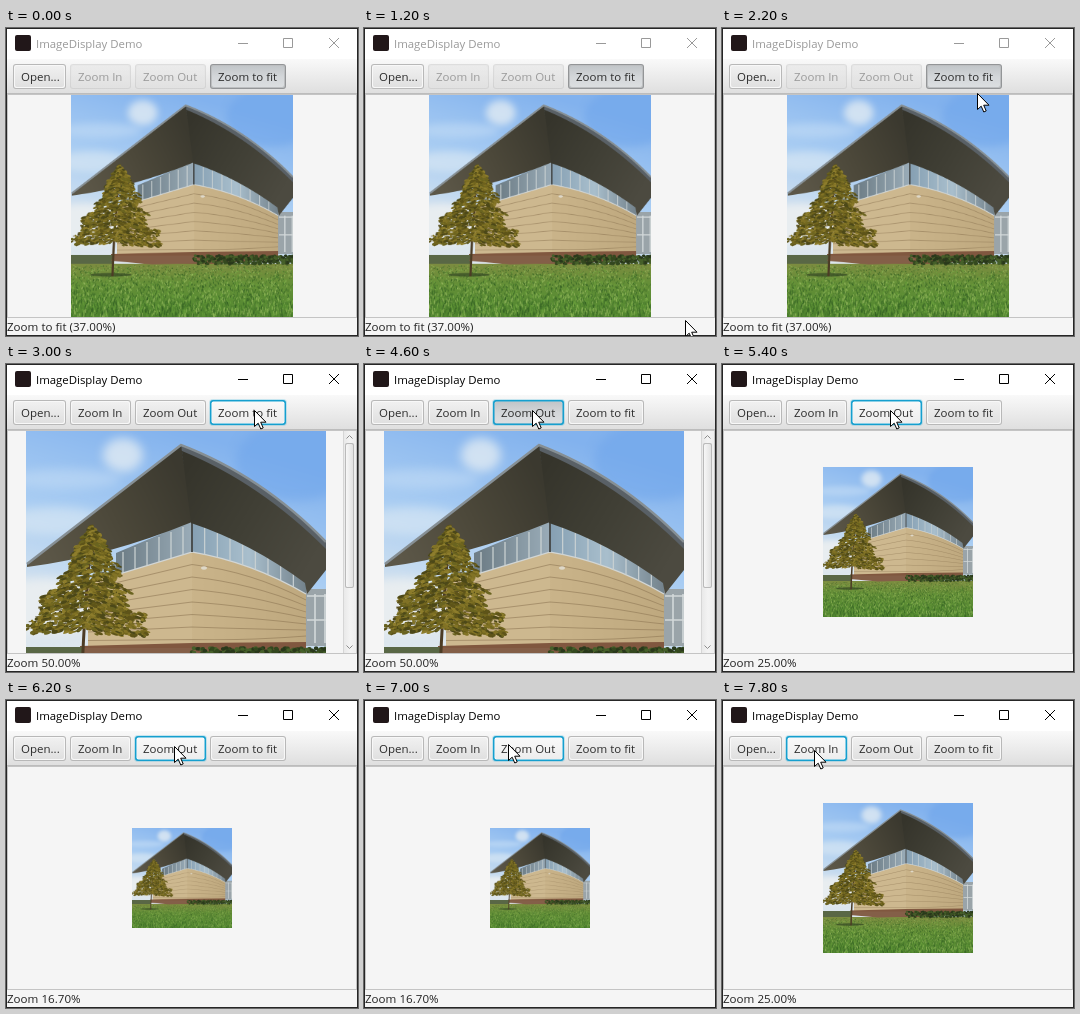
These frames come from a looping animation (352x308 px, 8 s). An HTML page with a canvas:

```html
<!DOCTYPE html>
<html lang="en">
<head>
<meta charset="utf-8">
<title>ImageDisplay Demo</title>
<style>
html, body { margin: 0; width: 100%; height: 100%; overflow: hidden; background: #fff; }
canvas { display: block; width: 100vw; height: 100vh; }
</style>
</head>
<body>
<canvas id="stage" width="352" height="308"></canvas>
<script>
const ctx = document.getElementById('stage').getContext('2d');
const LOOP = 8000, STEP = 200;
const FONT = '"Open Sans", "Noto Sans", sans-serif';

// [time, x, y] of the pointer tip
const pointerPath = [
  [1200, 321, 292], [1600, 296, 190], [2000, 258, 80], [2200, 255, 65],
  [2400, 249, 48], [2600, 248, 46], [3600, 248, 46], [4400, 168, 46],
  [6400, 168, 46], [7000, 144, 44], [7400, 98, 50], [7600, 92, 50], [8000, 92, 50]
];
const zooms = [[0, 37], [2800, 50], [4800, 25], [6200, 16.7], [7800, 25]];
const focuses = [[0, ''], [2600, 'Zoom to fit'], [4600, 'Zoom Out'], [7600, 'Zoom In']];
const presses = [[2600, 2800], [4600, 4800], [6000, 6200], [7600, 7800]];
const buttons = [['Open...', 7, 53], ['Zoom In', 64, 61], ['Zoom Out', 129, 71], ['Zoom to fit', 204, 76]];

const at = (track, t) => track.reduce((value, [start, v]) => t >= start ? v : value, track[0][1]);

function pointerAt(t) {
  if (t < pointerPath[0][0]) return null;
  const i = pointerPath.findIndex(p => p[0] > t);
  const [t0, x0, y0] = pointerPath[i - 1], [t1, x1, y1] = pointerPath[i];
  const k = (t - t0) / (t1 - t0);
  return [Math.round(x0 + (x1 - x0) * k), Math.round(y0 + (y1 - y0) * k)];
}

function rect(c, x, y, w, h, fill) {
  c.fillStyle = fill;
  c.fillRect(x, y, w, h);
}

function shape(c, fill, path) {
  c.fillStyle = fill;
  c.fill(new Path2D(path));
}

function line(c, color, width, path) {
  c.strokeStyle = color;
  c.lineWidth = width;
  c.stroke(new Path2D(path));
}

function gradient(c, x0, y0, x1, y1, ...colors) {
  const g = c.createLinearGradient(x0, y0, x1, y1);
  colors.forEach((color, i) => g.addColorStop(i / (colors.length - 1), color));
  return g;
}

function rounded(x, y, w, h, r, fill) {
  ctx.fillStyle = fill;
  ctx.beginPath();
  ctx.roundRect(x, y, w, h, r);
  ctx.fill();
}

function text(s, x, y, color, size = 11.6) {
  ctx.font = `${size}px ${FONT}`;
  ctx.fillStyle = color;
  ctx.fillText(s, x, y);
}

function seeded(seed) {
  return () => (seed = (seed * 16807) % 2147483647) / 2147483647;
}

function blob(c, color, x, y, rx, ry, tilt = 0) {
  c.fillStyle = color;
  c.beginPath();
  c.ellipse(x, y, rx, ry, tilt, 0, 7);
  c.fill();
}

function paintSky(c) {
  rect(c, 0, 0, 300, 300, gradient(c, 160, 0, 100, 210, '#82b2ee', '#a9cdf3', '#dde7ee'));
  c.filter = 'blur(10px)';
  blob(c, '#e2ebf3cc', 97, 24, 20, 17);
  blob(c, '#c6def688', 40, 48, 55, 10);
  blob(c, '#dde9f499', 30, 90, 50, 14);
  blob(c, '#6fa5ea88', 270, 30, 60, 40);
  blob(c, '#e8edf0', 20, 175, 60, 28);
  c.filter = 'none';
}

function paintBuilding(c) {
  rect(c, 279, 158, 21, 57, '#9aa4a9');
  line(c, '#d3d9da', 1.6, 'M281 165H300M281 189H300M289 163V212M299 163V212');

  shape(c, '#cdb88f', 'M62 151L166 121V230L62 217Z');
  shape(c, gradient(c, 166, 0, 280, 0, '#cab48a', '#bfa97f'),
    'M166 121Q225 131 280 163V214L166 218Z');
  for (let i = 1; i < 8; i++) {
    const y = 121 + i * 12.5;
    line(c, '#8f795699', 0.9, `M62 ${150 + i * 8.5}L166 ${y}Q225 ${y + 8 - i} 280 ${163 + i * 6}`);
  }
  shape(c, '#80573f', 'M54 215L166 212L280 211V222L166 230L54 222Z');

  shape(c, gradient(c, 96, 0, 166, 0, '#6f7f88', '#9aacb8'), 'M90 122L166 90V121L90 144Z');
  shape(c, gradient(c, 166, 0, 280, 0, '#86a0b3', '#a9bfcd', '#74838c'),
    'M166 90Q225 110 280 152V163Q225 131 166 121Z');
  line(c, '#d2d6d5', 1.3, 'M90 144L166 121Q225 131 280 163');
  for (let i = 0; i < 6; i++) {
    const x = 97 + i * 12;
    line(c, '#ced5d5', 1.2, `M${x} ${121 - i * 5}V${142 - i * 3.6}`);
  }
  for (let i = 0; i < 9; i++) {
    const k = i / 9, x = 166 + 114 * k;
    line(c, i ? '#c9d1d3' : '#4a4f50', i ? 1.2 : 2,
      `M${x} ${90 + 40 * k + 22 * k * k}V${121 + 20 * k + 22 * k * k}`);
  }

  shape(c, gradient(c, 20, 130, 165, 60, '#5c5748', '#4c483a', '#3b392f'),
    'M1 133L155 13L166 91Q80 126 1 136Z');
  shape(c, gradient(c, 155, 40, 290, 120, '#35342b', '#403f35', '#4c4a40'),
    'M155 13Q236 44 300 110V139L281 163L279 152Q225 112 165 92Z');
  shape(c, '#596066', 'M155 13Q236 44 300 110V118Q234 52 156 20Z');
  line(c, '#868f94', 2.5, 'M1 133L155 14Q236 45 300 111');
  blob(c, '#ded8c8', 178, 137, 3, 1.7);
}

function paintGarden(c, random) {
  rect(c, 0, 216, 58, 15, '#596745');
  rect(c, 0, 228, 300, 72, gradient(c, 0, 229, 0, 300, '#7d8c40', '#668f38', '#5b8c34', '#4f842e'));
  shape(c, '#845f48', 'M58 217L166 217L180 227L110 229L54 224Z');
  for (let i = 0; i < 320; i++) {
    const x = 166 + random() * 134;
    blob(c, ['#34481f', '#46602a', '#29381b'][i % 3], x, 217 + random() * 12, 2.2, 1.8);
  }
  for (let i = 0; i < 3200; i++) {
    const y = 231 + random() * 71, x = random() * 300;
    const len = 1 + (y - 229) / 16;
    line(c, ['#9bbd62aa', '#315f22aa', '#6ca43e99', '#406e2a99'][i % 4], 1.1,
      `M${x} ${y}l${random() * 3 - 1.5} ${-len}`);
  }
  blob(c, '#374c25bb', 54, 243, 28, 2.5);
}

function paintTree(c, random) {
  line(c, '#4c3c25', 3, 'M56 245Q58 180 66 100');
  const leaves = ['#5e5419', '#72661f', '#827326', '#6a6420', '#8d7d2c', '#4c4818'];
  // Drooping layered boughs, each built from small flat leaves
  for (let i = 0; i < 42; i++) {
    const k = i / 41, side = i % 2 ? 1 : -1;
    const reach = (6 + 56 * k ** 0.85) * (0.72 + 0.38 * random());
    const x0 = 66 - 5 * k, y0 = 98 + 100 * k;
    line(c, '#51461f', 0.8, `M${x0} ${y0}L${x0 + side * reach} ${y0 + 5}`);
    for (let j = 0; j < 14 + reach * 0.8; j++) {
      const s = random();
      blob(c, leaves[Math.floor(random() * 6)], x0 + side * reach * s,
        y0 + 6 * s + (random() - 0.5) * (10 - 6 * s), 1.2 + random() * 2.8, 0.8 + random(), side * 0.35);
    }
  }
}

function makePhoto() {
  const photo = document.createElement('canvas');
  photo.width = photo.height = 600;
  const c = photo.getContext('2d');
  const random = seeded(71);
  c.scale(2, 2);
  paintSky(c);
  paintBuilding(c);
  paintGarden(c, random);
  paintTree(c, random);
  return photo;
}

const photo = makePhoto();

function drawTitleBar(active) {
  rect(ctx, 1, 1, 350, 30, '#fff');
  rounded(9, 7, 16, 16, 2, '#211719');
  const color = active ? '#000' : '#999';
  text('ImageDisplay Demo', 30, 20, color, 11.4);
  rect(ctx, 232, 15, 10, 1, color);
  line(ctx, color, 1, 'M277.5 10.5h9v9h-9Z');
  line(ctx, color, 1, 'M323 10L333 20M333 10L323 20');
}

function drawButton([label, x, w], t, focus, pointer) {
  const fit = label === 'Zoom to fit';
  const focused = label === focus;
  const selected = fit && t < 2800;
  const pressed = focused && presses.some(([a, b]) => t >= a && t < b);
  const hover = pointer && pointer[0] >= x && pointer[0] < x + w && pointer[1] >= 36 && pointer[1] < 61;
  const disabled = t < 2800 && label.startsWith('Zoom') && !fit;
  ctx.globalAlpha = disabled ? 0.4 : 1;
  if (focused) {
    rounded(x - 1, 35, w + 2, 27, 4, '#039ed333');
    rounded(x, 36, w, 25, 3, '#169fce');
    rounded(x + 1.5, 37.5, w - 3, 22, 2, pressed ? '#c6d0d5' : '#fff');
  } else {
    rounded(x, 36, w, 25, 3, selected ? '#939597' : '#b8b8b8');
    rounded(x + 1, 37, w - 2, 23, 2, selected ? '#bcbec0' : '#f8f8f8');
  }
  const fill = selected || pressed ? ['#c0c4c7', '#d3d6d9', '#dcdfe1']
    : hover ? ['#f9f9f9', '#ededed'] : ['#f1f1f1', '#dfdfdf'];
  rounded(x + 2, 38, w - 4, 21, 2, gradient(ctx, 0, 37, 0, 60, ...fill));
  text(label, x + 8, 53, '#2b2b2b', 11.5);
  ctx.globalAlpha = 1;
}

function drawScrollBar() {
  rect(ctx, 337, 67, 13, 222, '#d6d6d6');
  rect(ctx, 338, 67, 12, 222, gradient(ctx, 338, 0, 350, 0, '#e9e9e9', '#f3f3f3', '#eeeeee'));
  rounded(339, 79, 9, 145, 2, '#bababa');
  rounded(340, 80, 7, 143, 1.5, gradient(ctx, 340, 0, 347, 0, '#f7f7f7', '#e2e2e2'));
  line(ctx, '#8c8c8c', 1, 'M340.5 74.5L343.5 71.5L346.5 74.5M340.5 281.5L343.5 284.5L346.5 281.5');
}

function drawContent(zoom) {
  rect(ctx, 1, 66, 350, 224, '#c4c4c4');
  rect(ctx, 2, 67, 348, 222, '#f5f5f5');
  const size = Math.round(zoom * 6);
  ctx.save();
  ctx.beginPath();
  ctx.rect(2, 67, 348, 222);
  ctx.clip();
  const left = zoom === 50 ? 20 : 176 - size / 2;
  const top = Math.max(67, 178 - size / 2);
  ctx.imageSmoothingQuality = 'high';
  ctx.drawImage(photo, left, top, size, size);
  ctx.restore();
  if (zoom === 50) drawScrollBar();
}

function drawPointer([x, y]) {
  ctx.save();
  ctx.translate(x + 0.5, y + 0.5);
  const arrow = 'M0 0V16L3.7 12.7L6.3 18.5L8.7 17.4L6.2 11.7H11.5Z';
  shape(ctx, '#fff', arrow);
  line(ctx, '#000', 1, arrow);
  ctx.restore();
}

function draw(now) {
  const t = Math.floor(now % LOOP / STEP) * STEP;
  const zoom = at(zooms, t), focus = at(focuses, t), pointer = pointerAt(t);
  rect(ctx, 0, 0, 352, 308, '#262626');
  drawTitleBar(t >= 2600);
  rect(ctx, 1, 31, 350, 35, gradient(ctx, 0, 31, 0, 65, '#f9f9f9', '#dfdfdf'));
  rect(ctx, 1, 65, 350, 1, '#bcbcbc');
  buttons.forEach(button => drawButton(button, t, focus, pointer));
  drawContent(zoom);
  rect(ctx, 1, 290, 350, 17, '#f5f5f5');
  text(`Zoom ${zoom === 37 ? 'to fit (37.00%)' : zoom.toFixed(2) + '%'}`, 1, 303, '#222');
  if (pointer) drawPointer(pointer);
}

function tick() {
  draw(performance.now());
  requestAnimationFrame(tick);
}
tick();
</script>
</body>
</html>
```
